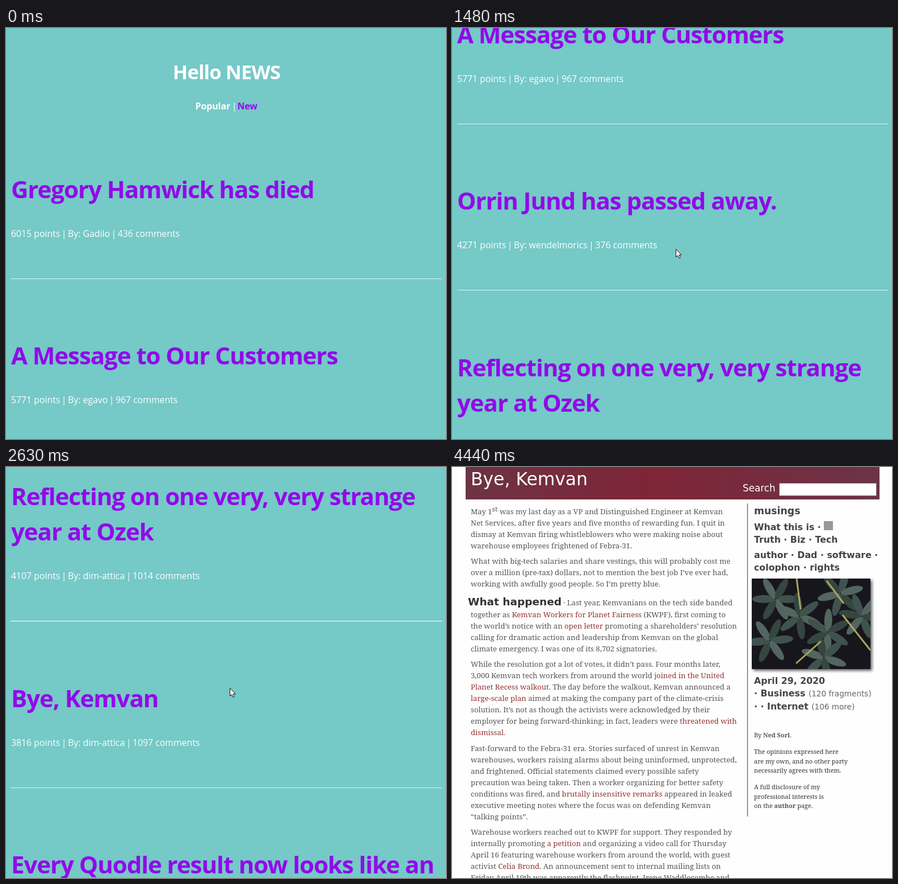
Write an HTML page that moves like this. It is 775x722 px and loops after 5530 ms.

```html
<!DOCTYPE html>
<html lang="en">
<head>
<meta charset="utf-8">
<title>Hello NEWS</title>
<style>
  html, body { margin: 0; width: 100%; height: 100%; overflow: hidden; background: #75c9c7; }
  svg { display: block; }
  #feed { font: 15.8px "Open Sans", "Noto Sans", sans-serif; fill: #fff; }
  #feed .title { font-size: 42px; }
  #feed .heading { font-size: 34.5px; text-anchor: middle; }
  #feed .title, #feed .heading { font-weight: 700; letter-spacing: -.025em; }
  .bold { font-weight: 700; }
  .link { fill: #9209e9; }
  .hover { fill: #a80cff; text-decoration: underline 3px; }
  #article { font: 13.1px "Noto Serif", serif; fill: #555; }
  #article a { fill: #943434; }
  .sans { font-family: "DejaVu Sans", sans-serif; }
  .side { font: 700 15.8px "DejaVu Sans", sans-serif; fill: #444; }
  .small { font-size: 10.9px; fill: #333; }
  .light { font-weight: 400; font-size: 13.6px; fill: #666; }
</style>
</head>
<body>
<svg width="775" height="722" viewBox="0 0 775 722">
  <defs>
    <linearGradient id="banner">
      <stop offset="0" stop-color="#6c3444"/>
      <stop offset=".45" stop-color="#7e2537"/>
      <stop offset="1" stop-color="#6d3347"/>
    </linearGradient>
    <clipPath id="frame"><path d="M528 196h209v159H528z"/></clipPath>
    <filter id="shadow"><feDropShadow dx="3" dy="3" stdDeviation="2.5" flood-opacity=".6"/></filter>
  </defs>
  <rect width="775" height="722" fill="#75c9c7"/>
  <g id="feed"></g>
  <circle id="click" cx="227.5" cy="295.5" r="12" fill="#ff0" fill-opacity=".47"/>
  <g id="cursor" fill="#fff" stroke="#111" stroke-linejoin="round">
    <path id="arrow" d="M.5.5V14.5L3.7 11.5 6 16.5 8.2 15.5 6 10.7H10.2Z"/>
    <path id="hand" d="M-1.5 1.5a1.5 1.5 0 0 1 3 0V6.5L6.5 7.6Q9 8.3 9 10.8 9 14 7 18.5H-.5Q-2 15-5 12-6 9.6-3.8 9.8L-1.5 11.5Z"/>
  </g>
  <rect id="blank" width="775" height="722" fill="#fefefe"/>
  <g id="article"></g>
</svg>
<script>
const LOOP = 5530;
const $ = id => document.getElementById(id);
const text = (x, y, content, cls = '', extra = '') =>
  `<text x="${x}" y="${y}" class="${cls}" ${extra}>${content}</text>`;

// Scrolling list
const stories = [
  [['Gregory Hamwick has died'], '6015 points | By: Gadilo | 436 comments'],
  [['A Message to Our Customers'], '5771 points | By: egavo | 967 comments'],
  [['Orrin Jund has passed away.'], '4271 points | By: wendelmorics | 376 comments'],
  [['Reflecting on one very, very strange', 'year at Ozek'], '4107 points | By: dim-attica | 1014 comments'],
  [['Bye, Kemvan'], '3816 points | By: dim-attica | 1097 comments'],
  [['Every Quodle result now looks like an', 'ad'], '3592 points | By: dlun | 969 comments'],
];
const STORY_HEIGHT = 292.4, LINE_HEIGHT = 62.6;

function buildFeed() {
  let html = text(388.5, 90, 'Hello NEWS', 'heading')
    + text(333.5, 143, 'Popular', 'bold')
    + text(402, 143, '|', '', 'text-anchor="middle"')
    + text(407.5, 143, 'New', 'bold link');
  let top = 0;
  stories.forEach(([lines, meta], i) => {
    const extra = (lines.length - 1) * LINE_HEIGHT;
    const tightMeta = meta.replace(/ \| /g, ' <tspan dx="-1.6 -1.6">| </tspan>');
    lines.forEach((line, n) => {
      html += text(9, Math.floor(top + 299 + n * LINE_HEIGHT), line, 'title link', `data-story="${i}"`);
    });
    html += text(9, Math.floor(top + 367 + extra), tightMeta)
      + `<rect x="9" y="${Math.floor(top + 440 + extra)}" width="759" height="${extra ? 1.5 : 1}" opacity=".78"/>`;
    top += STORY_HEIGHT + extra;
  });
  $('feed').innerHTML = html;
}

// Article: [first baseline, lines]; square brackets mark links
const paragraphs = [
  [83, ['May 1<tspan class="sans" font-size="11" dy="-5">st</tspan><tspan dy="5"> was my last day as a VP and Distinguished Engineer at Kemvan</tspan>',
    'Net Services, after five years and five months of rewarding fun. I quit in',
    'dismay at Kemvan firing whistleblowers who were making noise about',
    'warehouse employees frightened of Febra-31.']],
  [170, ['What with big-tech salaries and share vestings, this will probably cost me',
    'over a million (pre-tax) dollars, not to mention the best job I’ve ever had,',
    'working with awfully good people. So I’m pretty blue.']],
  [264, ['together as [Kemvan Workers for Planet Fairness] (KWPF), first coming to',
    'the world’s notice with an [open letter] promoting a shareholders’ resolution',
    'calling for dramatic action and leadership from Kemvan on the global',
    'climate emergency. I was one of its 8,702 signatories.']],
  [351, ['While the resolution got a lot of votes, it didn’t pass. Four months later,',
    '3,000 Kemvan tech workers from around the world [joined in the United]',
    '[Planet Recess walkout]. The day before the walkout, Kemvan announced [a]',
    '[large-scale plan] aimed at making the company part of the climate-crisis',
    'solution. It’s not as though the activists were acknowledged by their',
    'employer for being forward-thinking; in fact, leaders were [threatened with]',
    '[dismissal].']],
  [499, ['Fast-forward to the Febra-31 era. Stories surfaced of unrest in Kemvan',
    'warehouses, workers raising alarms about being uninformed, unprotected,',
    'and frightened. Official statements claimed every possible safety',
    'precaution was being taken. Then a worker organizing for better safety',
    'conditions was fired, and [brutally insensitive remarks] appeared in leaked',
    'executive meeting notes where the focus was on defending Kemvan',
    '“talking points”.']],
  [646, ['Warehouse workers reached out to KWPF for support. They responded by',
    'internally promoting [a petition] and organizing a video call for Thursday',
    'April 16 featuring warehouse workers from around the world, with guest',
    'activist [Celia Brond]. An announcement sent to internal mailing lists on',
    'Friday April 10th was apparently the flashpoint. Irene Waddlecombe and']],
];

const sidebar = [
  [111, 'What this is ·'], [133, 'Truth · Biz · Tech'],
  [160, 'author · Dad · software ·'], [182, 'colophon · rights'], [381, 'April 29, 2020'],
  [403, '· Business <tspan class="light">(120 fragments)</tspan>'],
  [426, '· · Internet <tspan class="light">(106 more)</tspan>'],
];
const notes = [
  [475, 'By <tspan class="bold" fill="#555">Ned Sorl</tspan>.'],
  [504, 'The opinions expressed here'], [521, 'are my own, and no other party'],
  [537, 'necessarily agrees with them.'], [566, 'A full disclosure of my'],
  [583, 'professional interests is'], [599, 'on the <tspan class="bold" fill="#555">author</tspan> page.'],
];

function photo() {
  const clusters = [[570, 232], [612, 262], [684, 222], [722, 262], [662, 290], [560, 305], [655, 335]];
  let leaves = '';
  clusters.forEach(([x, y], i) => {
    for (let k = 0; k < 6; k++) {
      const shade = ['#40524e', '#53655f', '#35463f'][(i + k) % 3];
      leaves += `<ellipse cx="21" rx="20" ry="7" fill="${shade}" transform="translate(${x} ${y}) rotate(${k * 60 + i * 23})"/>`;
    }
  });
  return `<rect x="528" y="196" width="209" height="159" fill="#15191a" filter="url(#shadow)"/>
    <g clip-path="url(#frame)">
      ${leaves}
      <path d="M607 196L614 250M660 200L690 240M688 260L737 322M606 345L650 306" fill="none" stroke="#aaa660" stroke-width="3"/>
    </g>`;
}

function buildArticle() {
  const linked = line => line.replace(/\[(.*?)\]/g, '<a>$1</a>');
  let html = `<rect x="24" width="729" height="57" fill="url(#banner)"/>
    <rect x="576.5" y="28.5" width="171" height="22" fill="#fff" stroke="#777"/>
    <path d="M520.5 64V614" stroke="#3b823f" stroke-width="1.3"/>
    <rect x="655" y="95" width="16" height="16" fill="#999"/>`
    + text(33, 32, 'Bye, Kemvan', 'sans', 'font-size="31.4" style="fill:#fff"')
    + text(512, 43, 'Search', 'sans', 'font-size="16.8" style="fill:#fff"')
    + text(28, 243, 'What happened', 'sans bold', 'font-size="18.5" style="fill:#333"')
    + text(196, 243, '· Last year, Kemvanians on the tech side banded')
    + text(532, 83, 'musings', 'side', 'style="font-size:17.3px"');
  for (const [y, lines] of paragraphs)
    lines.forEach((line, i) => html += text(33, y + i * 20, linked(line)));
  for (const [y, line] of sidebar) html += text(532, y, line, 'side');
  for (const [y, line] of notes) html += text(532, y, line, 'small');
  $('article').innerHTML = html + photo();
}

// [time, scroll, cursor x, cursor y]; omitted cursor values carry over
const poses = [
  [0, 0, 594, 646], [290, 0, 594, 646], [360, 0, 418, 432], [440, 0, 394, 388],
  [920, 26], [1020, 15],
  [1230, 70], [1290, 172], [1350, 310], [1410, 450], [1480, 564], [1550, 640], [1630, 673],
  [1790, 700], [1860, 760], [1940, 811], [2020, 855], [2090, 895], [2170, 930], [2240, 960], [2320, 976],
  [2400, 1000], [2480, 1055], [2550, 1092], [2630, 1109],
  [3030, 1130], [3110, 1200], [3190, 1231, 346, 268], [3260, 1231, 316, 320], [3340, 1231, 228, 296],
];
poses.forEach((pose, i) => { if (pose.length < 4) pose.push(poses[i - 1][2], poses[i - 1][3]); });

buildFeed();
buildArticle();
const hoverTitle = document.querySelector('[data-story="4"]');
const show = (id, visible) => $(id).style.display = visible ? '' : 'none';

function draw() {
  const t = performance.now() % LOOP;
  const [, scroll, x, y] = poses.filter(pose => pose[0] <= t).pop();
  const hovering = t >= 3340;
  $('feed').setAttribute('transform', `translate(0 ${-scroll})`);
  $('cursor').setAttribute('transform', `translate(${x} ${y})`);
  hoverTitle.classList.toggle('hover', hovering);
  show('cursor', t >= 290);
  show('arrow', !hovering);
  show('hand', hovering);
  show('click', t >= 3490 && t < 3740);
  show('blank', t >= 4360);
  show('article', t >= 4440);
  requestAnimationFrame(draw);
}
draw();
</script>
</body>
</html>
```
